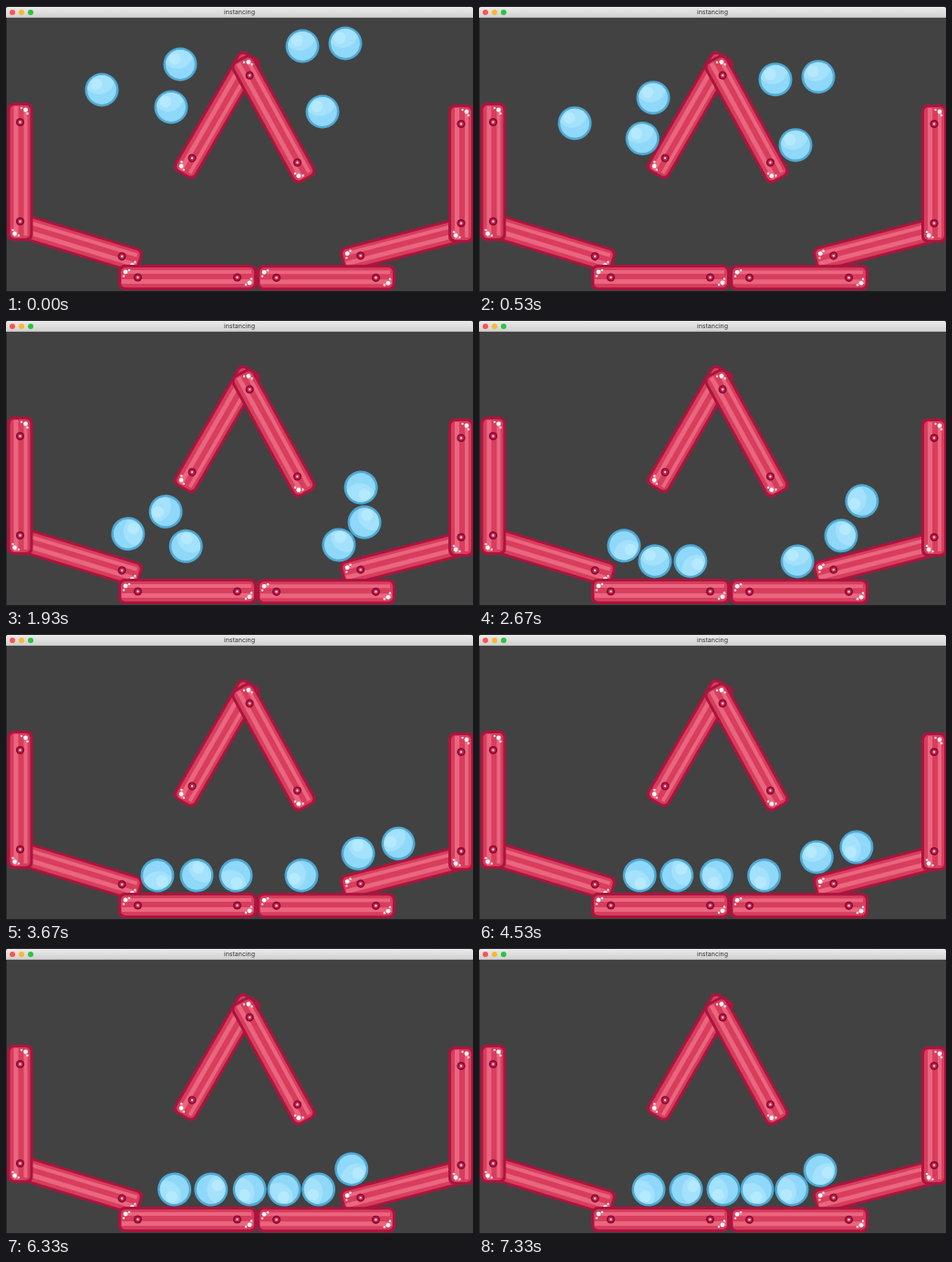
An HTML page with a canvas for the animation above (7400 ms loop, 512 by 314 pixels).

```html
<!DOCTYPE html>
<html lang="en">
<head>
<meta charset="utf-8">
<title>instancing</title>
<style>
html, body { margin: 0; width: 100%; height: 100%; overflow: hidden; background: #424242; }
canvas { position: absolute; left: 0; top: 0; }
#bar {
  position: absolute; left: 0; top: 1px; width: 512px; height: 12px; box-sizing: border-box;
  background: linear-gradient(#ebebeb, #d2d2d2); border-bottom: 1px solid #b4b4b4;
  border-radius: 2px 2px 0 0; text-align: center;
  font: 7px/12px Inter, Roboto, sans-serif; color: #333;
}
#bar i { position: absolute; top: 3px; width: 6px; height: 6px; border-radius: 50%; }
</style>
</head>
<body>
<canvas id="stage" width="512" height="314"></canvas>
<div id="bar">
  <i style="left:4px;background:#f9564f"></i>
  <i style="left:14px;background:#f8b92e"></i>
  <i style="left:24px;background:#2bc43e"></i>
  instancing
</div>
<script>
const ctx = document.getElementById('stage').getContext('2d');
const LOOP = 7400, STEP = LOOP / 111, RADIUS = 18.5, FLOOR = 265;
const HALF_G = 129;     // px per second squared
const ROLL_ENDS = [3670, 5470, LOOP];

// centre x, centre y, angle in degrees; back to front
const beams = [
  [75, 259, 17], [441.5, 260.5, -14.5],
  [15.5, 182, 90], [499, 184, 90],
  [199, 298, 0], [351, 298.3, 0],
  [231.3, 119.8, 120], [293.3, 124, 61.3]
];

// drop: x, top y, first contact y; hops: time, x, y of each bounce;
// rolls: x at each roll end
const balls = [
  { drop: [105, 92, 234], hops: [[2000,136,243], [2670,159,248], [3200,155,251]],
    rolls: [166, 183, 186] },
  { drop: [181, 111, 143], hops: [[1180,146,246], [1380,160,232], [1930,197,248],
    [2070,206,265], [2670,232,265]], rolls: [252, 266, 268] },
  { drop: [191, 64, 127], hops: [[1380,159,194], [1930,175,210], [2300,186,265],
    [2670,193,265]], rolls: [209, 222, 227] },
  { drop: [325, 44, 117], hops: [[1000,346,136], [1600,383,177], [1930,389,184],
    [2300,406,197], [2670,420,199], [3000,435,229], [3600,431,229]],
    rolls: [430, 385, 374] },
  { drop: [372, 41, 198], hops: [[1600,386,214], [1930,393,222], [2200,395,238],
    [2670,397,237]], rolls: [386, 342, 343] },
  { drop: [347, 116, 157], hops: [[1200,382,243], [1930,365,247], [2450,353,265],
    [2670,349,265]], rolls: [324, 305, 305] }
];

function disc(x, y, r, color) {
  ctx.fillStyle = color;
  ctx.beginPath();
  ctx.arc(x, y, r, 0, 7);
  ctx.fill();
}

function panel(w, h, r, color) {
  ctx.fillStyle = color;
  ctx.beginPath();
  ctx.roundRect(-w / 2, -h / 2, w, h, r);
  ctx.fill();
}

function placed(x, y, angle, draw) {
  ctx.save();
  ctx.translate(x, y);
  ctx.rotate(angle);
  draw();
  ctx.restore();
}

function drawBeam() {
  panel(152, 28, 7, '#a9153e');
  panel(146, 22, 5, '#d83d5c');
  ctx.fillStyle = '#ea6680';
  ctx.fillRect(-70, -8, 140, 4);
  ctx.fillRect(-72, 2, 144, 5);
  for (const side of [-1, 1]) {
    disc(side * 54.5, 0, 4.6, '#8d0c31');
    disc(side * 54.5, 0, 2.8, '#c42750');
    disc(side * 54.5, 0, 1.2, '#ffd5df');
    disc(side * 68, side * 6, 2.4, '#fff');
    disc(side * 64, side * 8, 1.3, '#ffe3e9');
    disc(side * 70, side * 1.5, 1.2, '#ffe3e9');
  }
}

function drawBall() {
  disc(0, 0, RADIUS, '#4fa9d3');
  ctx.beginPath();
  ctx.arc(0, 0, RADIUS - 2.6, 0, 7);
  ctx.clip();
  disc(0, 0, RADIUS, '#8fd8f9');
  disc(-3, -12, 17, '#a3e1fc');
  disc(-6, -6, 6.5, '#b5e9fe');
}

// Height of a ball's centre resting at x: right ramp, ramp corners or floor
function ground(x) {
  if (x > 368) return 245.5 - (x - 368) * 0.25;
  const corner = x < 256 ? 147 : 368;
  const rise = Math.sqrt(Math.max(0, RADIUS ** 2 - (x - corner) ** 2));
  return Math.min(FLOOR, 267 - rise);
}

function pose({ drop: [x, top, hit], hops, rolls }, t) {
  const fall = 1000 * Math.sqrt((hit - top) / HALF_G);
  if (t <= fall) return [x, top + HALF_G * (t / 1000) ** 2];

  let from = [fall, x, hit];
  for (const hop of hops) {
    if (t <= hop[0]) {
      const [t0, x0, y0] = from, [t1, x1, y1] = hop;
      const u = (t - t0) / (t1 - t0), span = (t1 - t0) / 1000;
      return [x0 + (x1 - x0) * u,
              y0 + (y1 - y0) * u - HALF_G * span * span * u * (1 - u)];
    }
    from = hop;
  }

  let [t0, x0] = from;
  let i = 0;
  while (t > ROLL_ENDS[i]) {
    t0 = ROLL_ENDS[i];
    x0 = rolls[i++];
  }
  const u = (t - t0) / (ROLL_ENDS[i] - t0);
  const speedsUp = rolls[i] > 340 && i < 2;
  const eased = speedsUp ? u ** 1.4 : 1 - (1 - u) ** 1.4;
  const rollX = x0 + (rolls[i] - x0) * eased;
  return [rollX, ground(rollX)];
}

function render(now) {
  const t = Math.floor((now % LOOP + 4) / STEP) % 111 * STEP;
  ctx.fillStyle = '#424242';
  ctx.fillRect(0, 0, 512, 314);
  for (const [x, y, deg] of beams) placed(x, y, deg * Math.PI / 180, drawBeam);
  for (const ball of balls) {
    const [x, y] = pose(ball, t);
    placed(x, y, (x - ball.drop[0]) / RADIUS, drawBall);
  }
  ctx.fillStyle = '#1c1c1c';
  ctx.fillRect(0, 0, 512, 2);
  ctx.fillRect(0, 313, 512, 1);
  ctx.fillRect(0, 13, 0.6, 300);
}

const start = performance.now();
function tick() {
  render(performance.now() - start);
  requestAnimationFrame(tick);
}
tick();
</script>
</body>
</html>
```
